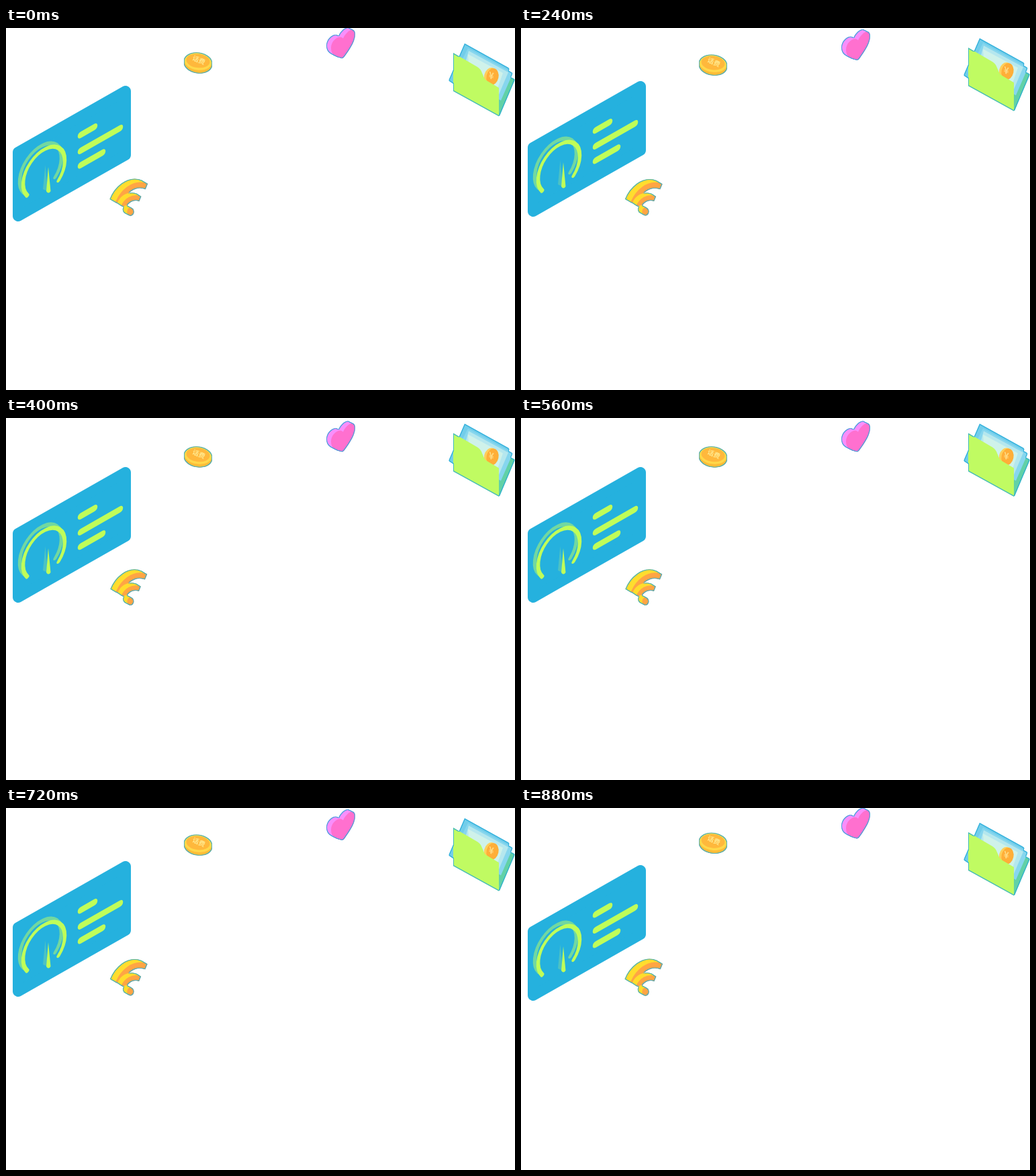
An HTML page for the animation above (960 ms loop, 758 by 539 pixels).

```html
<!DOCTYPE html>
<html lang="zh">
<head>
<meta charset="utf-8">
<title>Floating icons</title>
<style>
  @property --k { syntax: "<number>"; inherits: true; initial-value: 0; }
  html, body { margin: 0; width: 100%; height: 100%; overflow: hidden; background: #fff; }
  svg { display: block; width: 758px; height: 539px; animation: bob 960ms step-end infinite; }
  /* one sine cycle in twelve held poses */
  @keyframes bob {
    0%, 100% { --k: 0; }
    8.33%, 91.66% { --k: .067; }
    16.66%, 83.33% { --k: .25; }
    25%, 75% { --k: .5; }
    33.33%, 66.66% { --k: .75; }
    41.66%, 58.33% { --k: .933; }
    50% { --k: 1; }
  }
  .bob { transform: translateY(calc(var(--k) * var(--d) * 1px)); }
  .pulse { transform-origin: 183px 252px; transform: scale(calc(1 - .035 * var(--k))); }
  .rim { filter: url(#rim); }
  .line { fill: none; stroke: #c0fd59; stroke-linecap: round; }
  text { text-anchor: middle; font-family: "Noto Sans CJK SC", "Noto Sans CJK", sans-serif; font-weight: 700; }
</style>
</head>
<body>
<svg viewBox="0 0 758 539">
  <defs>
    <filter id="rim" x="-10%" y="-10%" width="120%" height="120%" color-interpolation-filters="sRGB">
      <feMorphology in="SourceAlpha" operator="erode" radius="1" result="core"/>
      <feFlood flood-color="#22a9d8" flood-opacity=".8"/>
      <feComposite in2="SourceAlpha" operator="in"/>
      <feComposite in2="core" operator="out" result="edge"/>
      <feMerge><feMergeNode in="SourceGraphic"/><feMergeNode in="edge"/></feMerge>
    </filter>
    <path id="arc" d="M-24.8 20.4A31 34 0 1 1 21.7 24.3"/>
  </defs>

  <g class="bob" style="--d:-14">
    <path d="M18 185L178 94V189L18 280Z" fill="#25b1de" stroke="#25b1de" stroke-width="16" stroke-linejoin="round"/>
    <g class="line" stroke-width="5.5">
      <use href="#arc" transform="matrix(1 -.57 0 1 51.5 210)" style="stroke:#72d8a0"/>
      <use href="#arc" transform="matrix(1 -.57 0 1 56.5 215)"/>
    </g>
    <path d="M58.5 204L55 240L62 243Z" fill="#4cc2c4"/>
    <path d="M63 207L60 243Q63 248 66.5 243Z" fill="#c0fd59"/>
    <path class="line" stroke-width="9.5" transform="matrix(1 -.57 0 1 0 0)"
      d="M111.5 222.5H131.5M111.5 246H169.5M111.5 267.5H143.5"/>
  </g>

  <g class="pulse"><g class="rim">
    <g data-depth="-8.5,-5" data-side="#ffdd2e" stroke="#ffa544" stroke-width="9">
      <path fill="none" d="M167 261.5C173 246 190 228 209.5 236"/>
    </g>
    <g data-depth="-6,-4" data-side="#ffdd2e" stroke="#ffa544" stroke-width="8">
      <path fill="none" d="M175 266.5C179 257 189 250 200 254.5"/>
    </g>
    <g data-depth="-6.5,-3.5" data-side="#ffdd2e" fill="#ffa544">
      <ellipse cx="185.5" cy="273.7" rx="5.2" ry="6.2"/>
    </g>
  </g></g>

  <g class="bob" style="--d:6.4"><g class="rim">
    <g data-depth="0,5" data-side="#ffbd38" fill="#ffd84a">
      <ellipse cx="286" cy="49.5" rx="21" ry="13" transform="rotate(7 286 49.5)"/>
    </g>
    <ellipse cx="286" cy="49" rx="17.5" ry="10.2" transform="rotate(7 286 49)" fill="#ffb83c"/>
    <text transform="matrix(.87 .36 -.35 .84 287 48)" y="3.5" font-size="10.5" fill="#ffe98f">话费</text>
  </g></g>

  <g class="bob" style="--d:5.6"><g class="rim">
    <g data-depth="-7,-3.5" data-side="#f98ffb" fill="#ff70cf">
      <path transform="matrix(1 -.57 0 1 502 22.5)"
        d="M-2 21.5C-10 15 -18 8 -18 -3C-18 -15 -5 -16 0 -7C5 -16 18 -15 18 -3C18 8 10 15 2 21.5Q0 23 -2 21.5Z"/>
    </g>
  </g></g>

  <g class="bob" style="--d:-15.6"><g class="rim">
    <path d="M690 40L757 76Q758 77 757 79L735 131L667 94Z" fill="#62d1a6"/>
    <path d="M683 23L748 59Q750 60 749 63L733 100L666 83L660 79Q659 78 660 76Z" fill="#72cdea"/>
    <path d="M688 30L753 66Q755 67 754 69L737 108L668 70Z" fill="#86d6ee"/>
    <path d="M689 34L748 66L734 99L680 66Z" fill="#b5e7ee"/>
    <path d="M688 39L740 67L732 90L690 70Z" fill="#cff2ea"/>
    <ellipse cx="722" cy="72" rx="10" ry="13" transform="rotate(12 722 72)" fill="#ffcf5a"/>
    <ellipse cx="724.5" cy="72.5" rx="9" ry="12.5" transform="rotate(12 724.5 72.5)" fill="#ffae38"/>
    <text transform="matrix(.9 .3 -.1 1 722.5 72)" y="4" font-size="14" fill="#ffdc85">¥</text>
    <path d="M666 37L702 58Q707 61 709 67L712 74Q713 77 717 79L734 89V131.500L666 94Z" fill="#c0fb62"/>
  </g></g>
</svg>
<script>
  // Give flat faces a solid side by stacking shifted copies behind them.
  const LAYERS = 12;
  for (const face of document.querySelectorAll("[data-depth]")) {
    const [dx, dy] = face.dataset.depth.split(",").map(Number);
    const paint = face.hasAttribute("fill") ? "fill" : "stroke";
    for (let i = LAYERS; i > 0; i--) {
      const side = face.cloneNode(true);
      side.setAttribute(paint, face.dataset.side);
      side.setAttribute("transform", `translate(${dx * i / LAYERS} ${dy * i / LAYERS})`);
      side.removeAttribute("data-depth");
      face.before(side);
    }
  }
</script>
</body>
</html>
```
